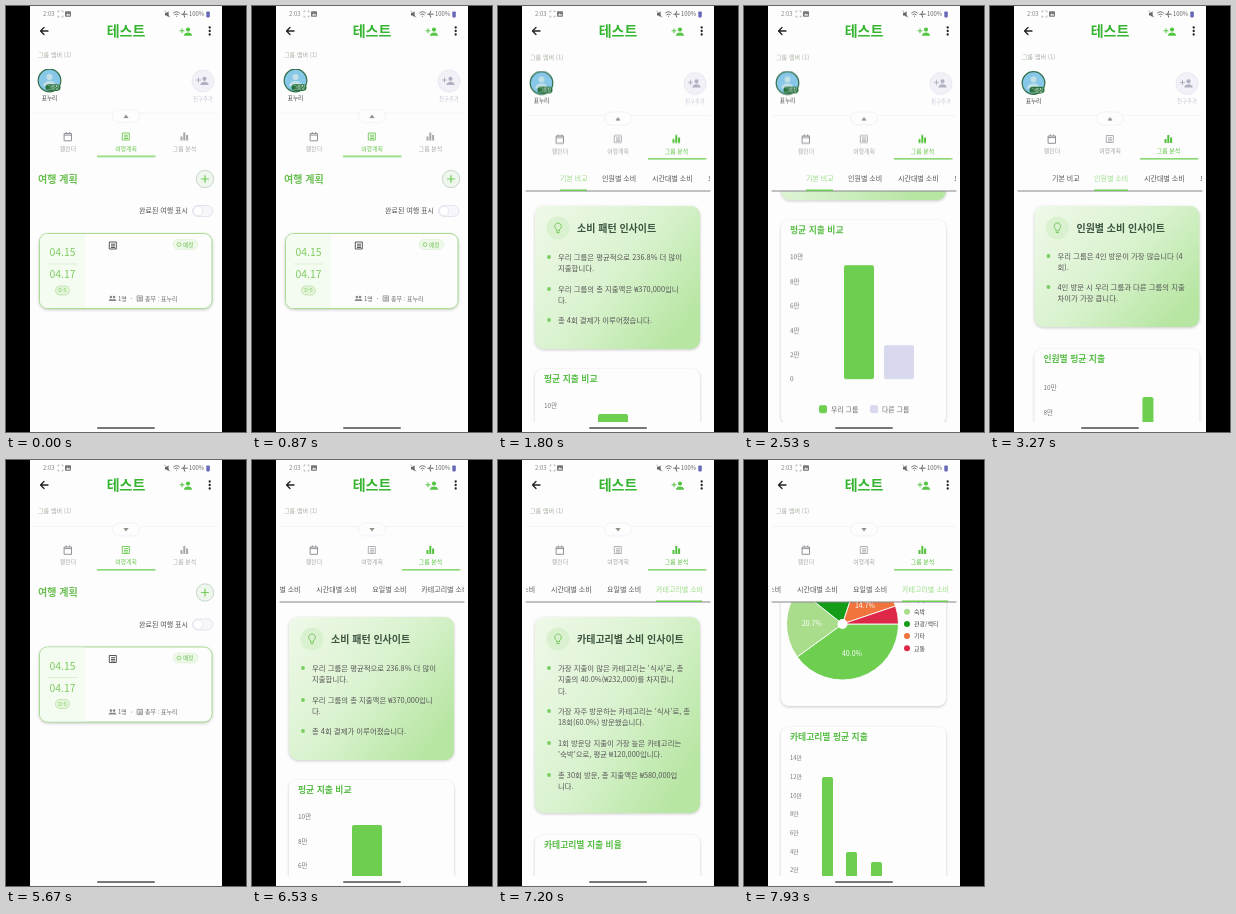
Animation, 240 px wide and 426 px high, one loop 8 s. Source, as an HTML page:

```html
<!DOCTYPE html>
<html lang="ko">
<head>
<meta charset="utf-8">
<title>테스트</title>
<style>
html, body { margin: 0; width: 100%; height: 100%; overflow: hidden; background: #000; }
svg { display: block; width: 100%; height: 100%; font-family: 'Noto Sans CJK KR', 'Noto Sans CJK', 'Noto Sans CJK JP', sans-serif; font-weight: 500; }
.anim { animation: 8s ease infinite; }
.line { fill: none; stroke: currentColor; stroke-linecap: round; stroke-linejoin: round; }
.bold { font-weight: 700; }
.shadow { filter: drop-shadow(0 1.5px 1.5px #0003); }

#lift { animation-name: lift; }
#drop { animation-name: drop; }
#members { animation-name: members; }
#arrow { animation-name: arrow; transform-box: fill-box; transform-origin: center; }
#views { animation-name: views; }
#tabLine { animation-name: tabLine; }
#planTab { animation-name: planTab; }
#groupTab { animation-name: groupTab; }
#strip { animation-name: strip; }
#subLine { animation-name: subLine; }
#sub0 { animation-name: sub0; }
#sub1 { animation-name: sub1; }
#sub4 { animation-name: sub4; }
#pages { animation-name: pages; }
#basic { animation-name: basic; }
#person { animation-name: person; }
#category { animation-name: category; }

@keyframes lift { 0%, 11.25% { transform: translateY(-2.5px) } 15%, 100% { transform: none } }
@keyframes drop { 0%, 64.375% { transform: translateY(43px) } 68.125%, 100% { transform: translateY(0) } }
@keyframes members { 0%, 64.375% { opacity: 1 } 68%, 100% { opacity: 0 } }
@keyframes arrow { 0%, 64.375% { transform: scaleY(-1) } 68.125%, 100% { transform: scaleY(1) } }
@keyframes views {
  0%, 11.25%, 63.125%, 73.125% { transform: translateX(0) }
  15%, 59.375%, 76.875%, 100% { transform: translateX(-192px) }
}
@keyframes tabLine {
  0%, 11.25%, 63.125%, 73.125% { transform: translateX(0) }
  15%, 59.375%, 76.875%, 100% { transform: translateX(58.5px) }
}
@keyframes planTab {
  0%, 11.25%, 63.125%, 73.125% { color: #69c94c }
  15%, 59.375%, 76.875%, 100% { color: #a8a8ac }
}
@keyframes groupTab {
  0%, 11.25%, 63.125%, 73.125% { color: #a8a8ac }
  15%, 59.375%, 76.875%, 100% { color: #55c03c }
}
@keyframes strip { 0%, 79.375% { transform: translateX(0) } 83.125%, 100% { transform: translateX(-101px) } }
@keyframes subLine {
  0%, 37.125%, 65.01%, 83.75% { x: 62px; width: 27px }
  40.5%, 65% { x: 104px; width: 34px }
  87.5%, 100% { x: 259px; width: 46px }
}
@keyframes sub0 {
  0%, 37.125%, 65.01%, 83.75% { color: #9bdc84 }
  40.5%, 65%, 87.5%, 100% { color: #555 }
}
@keyframes sub1 {
  0%, 37.125%, 65.01%, 100% { color: #555 }
  40.5%, 65% { color: #9bdc84 }
}
@keyframes sub4 { 0%, 83.75% { color: #555 } 87.5%, 100% { color: #9bdc84 } }
@keyframes pages {
  0%, 37.125%, 65.01%, 83.75% { transform: translateX(0) }
  42.125%, 65%, 87.5%, 100% { transform: translateX(-192px) }
}
@keyframes basic {
  0%, 25%, 65.01%, 100% { transform: translateY(0) }
  32.5%, 65% { transform: translateY(-150px) }
}
@keyframes person {
  0%, 44.375% { transform: translateY(0); visibility: visible }
  53.125%, 65% { transform: translateY(-297px); visibility: visible }
  65.01%, 100% { transform: translateY(-297px); visibility: hidden }
}
@keyframes category {
  0%, 65% { transform: translateY(0); visibility: hidden }
  65.01%, 91.875% { transform: translateY(0); visibility: visible }
  98.75%, 100% { transform: translateY(-330px); visibility: visible }
}
</style>
</head>
<body>
<svg id="stage" viewBox="0 0 240 426"></svg>
<script>
const GREEN = '#6dce50', LILAC = '#d8d8ee';

// y is the visual middle of the text
const text = (x, y, size, str, fill = 'currentColor', extra = '') =>
  `<text x="${x}" y="${y + size * 0.37}" font-size="${size}" fill="${fill}" ${extra}>${str}</text>`;
const mid = (x, y, size, str, fill, extra = '') => text(x, y, size, str, fill, `text-anchor="middle" ${extra}`);
const rect = (x, y, w, h, fill, r = 0, extra = '') =>
  `<rect x="${x}" y="${y}" width="${w}" height="${h}" rx="${r}" fill="${fill}" ${extra}/>`;
const dot = (x, y, r, fill, extra = '') => `<circle cx="${x}" cy="${y}" r="${r}" fill="${fill}" ${extra}/>`;
const line = (d, color = 'currentColor', w = 1) => `<path class="line" d="${d}" style="color:${color}" stroke-width="${w}"/>`;
const moving = (id, inner) => `<g id="${id}" class="anim">${inner}</g>`;
const at = (x, y, inner, scale = 1) => `<g transform="translate(${x} ${y}) scale(${scale})">${inner}</g>`;

const addPerson = (x, y, color) => at(x, y,
  dot(2, -2.2, 2.1, color) + `<path d="M-2 4V3Q-1 .8 2 .8T6 3V4Z" fill="${color}"/>` + line('M-6-1h4M-4-3v4', color, 1));
const people = (x, y) => at(x, y,
  dot(-1.6, -1.4, 1.3, '#888') + dot(1.6, -1.4, 1.3, '#888') + '<path d="M-4 2.4Q-3.6 .4-1.6 .4L0 1 1.6 .4Q3.6 .4 4 2.4Z" fill="#888"/>');
const sheet = (x, y, color, scale = 1) =>
  at(x, y, line('M-3.3-3.5h6.6v7h-6.6zM-1.6-1.3h3.2M-1.6 .4h3.2M-1.6 2h3.2', color, .9), scale);

function insight(height, title, items) {
  const bullets = items.map(([y, ...rows]) =>
    dot(51, y, 1.9, '#78cd60') + rows.map((row, i) => text(60, y + i * 11.6, 7.4, row, '#555')).join(''));
  return rect(37, 157, 165, height, 'url(#mint)', 9, 'class="shadow"')
    + dot(60, 179, 11.5, '#daf1cf')
    + at(60, 179, line('M-1.6 2.5v-1.3a3.3 3.3 0 1 1 3.2 0v1.3zM-1.2 4.6h2.4', '#6cc455', .9))
    + text(79, 179, 10, title, '#3c5540', 'class="bold"') + bullets.join('');
}

const panel = (y, height, title) =>
  rect(37, y, 165, height, '#fdfdfe', 8, 'class="shadow"')
  + text(46, y + 10, 8.8, title, '#58bd45', 'class="bold"');

const axis = (top, step, labels, size) =>
  labels.map((label, i) => text(46, top + i * step, size, label, '#777')).join('');
const bars = (base, list) =>
  list.map(([x, w, h, color = LILAC]) => rect(x, base - h, w, h, color, 2)).join('');
const legend = y => rect(75, y - 4, 8, 8, GREEN, 2) + text(87, y, 6.9, '우리 그룹', '#666')
  + rect(126, y - 4, 8, 8, LILAC, 2) + text(138, y, 6.9, '다른 그룹', '#666');

function pie(cx, cy, r, slices) {
  let angle = 0;
  const point = a => `${cx + r * Math.cos(a)} ${cy + r * Math.sin(a)}`;
  return slices.map(([share, color]) => {
    const from = angle;
    angle += share / 100 * Math.PI * 2;
    return `<path d="M${cx} ${cy}L${point(from)}A${r} ${r} 0 0 1 ${point(angle)}Z" fill="${color}" stroke="#fff" stroke-width=".9"/>`;
  }).join('') + dot(cx, cy, 5, '#fff');
}

const WON = ['10만', '8만', '6만', '4만', '2만', '0'];

const basic = insight(143, '소비 패턴 인사이트', [
    [208, '우리 그룹은 평균적으로 236.8% 더 많이', '지출합니다.'],
    [240, '우리 그룹의 총 지출액은 ₩370,000입니', '다.'],
    [271, '총 4회 결제가 이루어졌습니다.']])
  + panel(320, 204, '평균 지출 비교') + axis(357, 24.4, WON, 6.5)
  + bars(479, [[100, 30, 114, GREEN], [140, 30, 34]]) + legend(509);

const persons = [80, 94, 112.5, 131, 158, 184];
const personLabels = y => persons.map((x, i) => mid(x, y, 6.5, i + '인', '#777')).join('');
const person = insight(121, '인원별 소비 인사이트', [
    [207, '우리 그룹은 4인 방문이 가장 많습니다 (4', '회).'],
    [238, '4인 방문 시 우리 그룹과 다른 그룹의 지출', '차이가 가장 큽니다.']])
  + panel(300, 204, '인원별 평균 지출') + axis(339, 24.4, WON, 6.5)
  + bars(461, [[88, 11, 30], [107, 11, 42], [126, 11, 54], [145, 11, 113, GREEN], [160, 11, 66], [179, 11, 78]])
  + personLabels(469) + legend(491)
  + panel(525, 226, '인원별 방문 횟수') + rect(67, 552, 128, 133, '#f8f8fc')
  + axis(563, 24.4, ['10000', '8000', '6000', '4000', '2000', '0'], 7.4)
  + bars(685, [[89, 11, 112], [107, 11, 13], [126, 11, 9], [160, 11, 7], [179, 11, 4]])
  + personLabels(694);

const slices = [[40, GREEN, '식사'], [20.7, '#a9dd8c', '숙박'], [19.4, '#159c19', '관광/액티'], [14.7, '#f0743c', '기타'], [5.2, '#dd2947', '교통']];
const category = insight(196, '카테고리별 소비 인사이트', [
    [208, "가장 지출이 많은 카테고리는 '식사'로, 총", '지출의 40.0%(₩232,000)를 차지합니', '다.'],
    [251, "가장 자주 방문하는 카테고리는 '식사'로, 총", '18회(60.0%) 방문했습니다.'],
    [283, '1회 방문당 지출이 가장 높은 카테고리는', "'숙박'으로, 평균 ₩120,000입니다."],
    [315, '총 30회 방문, 총 지출액은 ₩580,000입', '니다.']])
  + panel(375, 201, '카테고리별 지출 비율') + pie(98.5, 494, 56, slices)
  + mid(108, 523, 7, '40.0%', '#fff') + mid(68, 493, 7, '20.7%', '#fff')
  + mid(88, 459, 7, '19.4%', '#fff') + mid(121, 475, 7, '14.7%', '#fff')
  + slices.map(([, color, name], i) => dot(163, 469.5 + i * 12.2, 3, color) + text(170, 469.5 + i * 12.2, 6, name, '#444')).join('')
  + panel(597, 185, '카테고리별 평균 지출')
  + axis(628, 18.7, ['14만', '12만', ...WON], 5.9)
  + bars(759, [[78, 11, 112, GREEN], [102, 11, 37, GREEN], [127, 11, 27, GREEN], [152, 11, 9, GREEN], [176, 11, 6, GREEN]]);

const plan = text(32, 132.7, 10, '여행 계획', '#6abf50', 'class="bold"')
  + dot(199, 132.5, 8.7, '#eef6ee', 'stroke="#b9cdbf" stroke-width=".8"') + line('M195.5 132.5h7M199 129v7', '#72cd58', 1.2)
  + text(133, 164, 7, '완료된 여행 표시', '#505050')
  + rect(186.5, 159, 20.5, 11, '#f7f7fb', 5.5, 'stroke="#dcdce8" stroke-width=".7"') + dot(192, 164.5, 4.6, '#fff', 'stroke="#dcdce8" stroke-width=".6"')
  + rect(33.5, 187, 172.5, 75, '#fdfdfe', 8, 'stroke="#a9db91" class="shadow"')
  + '<path d="M79 187.5H41.5a7.5 7.5 0 0 0-7.5 7.5v59a7.5 7.5 0 0 0 7.5 7.5H79z" fill="#f4fbf0"/>'
  + mid(56.5, 206, 10.4, '04.15', '#7fcb62') + line('M42 217.5h29', '#d3ecc5', .7) + mid(56.5, 228, 10.4, '04.17', '#7fcb62')
  + rect(49.5, 239.5, 14, 9, '#e3f5d9', 4.5, 'stroke="#a9db91" stroke-width=".6"') + mid(56.5, 244, 5.4, 'D-5', '#7fcb62')
  + sheet(107, 199, '#444')
  + rect(167, 193, 25, 10, '#eef8e8', 5, 'stroke="#d5eccb" stroke-width=".5"') + dot(173, 198, 1.9, 'none', 'stroke="#7bc962" stroke-width=".8"') + text(177, 198, 5.6, '예정', '#6abf50')
  + people(106.5, 252) + text(112, 252, 6, '1명', '#666') + dot(125.5, 252, .6, '#999')
  + sheet(134, 252, '#777', .75) + text(139, 252, 6, '총무 : 표누리', '#666');

const subTabs = [['sub0', 62, '기본 비교'], ['sub1', 104, '인원별 소비'], ['sub2', 154, '시간대별 소비'], ['sub3', 210, '요일별 소비'], ['sub4', 259, '카테고리별 소비']]
  .map(([id, x, name]) => `<g color="#555">${moving(id, text(x, 129, 7, name))}</g>`).join('');
const analysis = `<g clip-path="url(#pageClip)">${moving('pages',
    moving('basic', basic) + at(192, 0, moving('person', person) + moving('category', category)))}</g>`
  + line('M28 142h184', '#85858a', 1)
  + `<g clip-path="url(#stripClip)">${moving('strip', subTabs + `<rect id="subLine" class="anim" y="140.5" height="1.5" fill="${GREEN}"/>`)}</g>`;

const tabs = `<g color="#a8a8ac">${line('M58.5 87h7v7.3h-7zM58.5 88.6h7M60.3 85.8v1M63.7 85.8v1', '#929298', 1)}${mid(62, 102, 5.9, '캘린더')}</g>`
  + moving('planTab', sheet(120, 90, 'inherit') + mid(120, 102, 5.9, '여행계획'))
  + moving('groupTab', `<path d="M174.5 90h2v4h-2zM177.3 86h2v8h-2zM180.1 88.5h2v5.5h-2z" fill="currentColor"/>` + mid(178.5, 102, 5.9, '그룹 분석'))
  + `<rect id="tabLine" class="anim" x="91" y="109.2" width="58.5" height="1.3" fill="${GREEN}"/>`;

const handle = line('M28 66.5h184', '#f2f2f5', .7)
  + rect(106.5, 63, 27, 13, '#fdfdfe', 6.5, 'stroke="#ececf2" stroke-width=".7"')
  + '<path id="arrow" class="anim" d="M117.4 68h5.2l-2.6 3.6z" fill="#8d958a"/>';

const members = dot(43.5, 77, 11.3, '#87c7e8', 'stroke="#316f4a" stroke-width="1.2"')
  + dot(43.5, 73.5, 3, '#c4e0e6') + '<path d="M37 82.5q1-5 6.5-5t6.5 5z" fill="#c4e0e6"/>'
  + rect(39.5, 80.8, 15, 6.6, '#28723d', 3.3) + mid(47, 84.1, 4.4, '그룹장', '#fff')
  + mid(43.5, 94.7, 5.6, '표누리', '#333')
  + dot(197, 77.5, 11, '#f1f1f7', 'stroke="#e2e2ec" stroke-width=".7"') + addPerson(196.5, 77.5, '#b0b0c2')
  + mid(197, 95.3, 5.4, '친구추가', '#c3c3d4');

const header = text(37, 8, 6, '2:03', '#85858a')
  + line('M52 6v-1h1M56 5h1v1M57 10v1h-1M53 11h-1v-1', '#999', .7) + rect(59, 5.3, 6, 5.4, '#777', .8) + '<path d="M60 9.6l1.6-2 1.2 1.1.8-.8.8 1.7z" fill="#fff"/>'
  + '<path d="M159 7h1.6l2-1.8v6l-2-1.8H159z" fill="#666"/>' + line('M158.8 5l5 6', '#666', .6)
  + line('M167.5 7q3-2.8 6 0M168.8 8.6q1.7-1.4 3.4 0M170.5 10.3v.1', '#666', .9)
  + line('M175.7 8.2h5.6M178.7 5.2l-1 3 1 3', '#666', 1)
  + text(183, 8, 5.9, '100%', '#666') + rect(200.3, 5.4, 3.5, 6, '#6868b8', .8)
  + line('M42 25h-7.4M38 21.5l-3.5 3.5L38 28.5', '#222', 1.3)
  + mid(120, 25, 14, '테스트', '#35b52f', 'font-weight="900"')
  + addPerson(180, 25.8, '#55c443')
  + [21.5, 25, 28.5].map(y => dot(203.7, y, 1.15, '#222')).join('');

document.getElementById('stage').innerHTML = `
  <defs>
    <linearGradient id="mint" x1="0" y1="0" x2="1" y2=".7">
      <stop stop-color="#eff9e9"/><stop offset=".55" stop-color="#d9f2ce"/><stop offset="1" stop-color="#b7e6a3"/>
    </linearGradient>
    <clipPath id="bodyClip">${rect(24, 42, 192, 374, '#000')}</clipPath>
    <clipPath id="pageClip">${rect(24, 142, 192, 400, '#000')}</clipPath>
    <clipPath id="stripClip">${rect(28, 115, 184, 29, '#000')}</clipPath>
  </defs>
  ${rect(0, 0, 240, 426, '#000')}${rect(24, 0, 192, 426, '#fdfdfe')}
  <g clip-path="url(#bodyClip)">${moving('lift',
    text(32, 51, 6.1, '그룹 멤버 (1)', '#a5b0a0') + moving('members', members)
    + moving('drop', rect(24, 66, 192, 400, '#fdfdfe') + handle + moving('views', plan + at(192, 0, analysis)) + tabs))}</g>
  ${header}${rect(91, 421, 58, 2, '#77777c', 1)}`;
</script>
</body>
</html>
```
